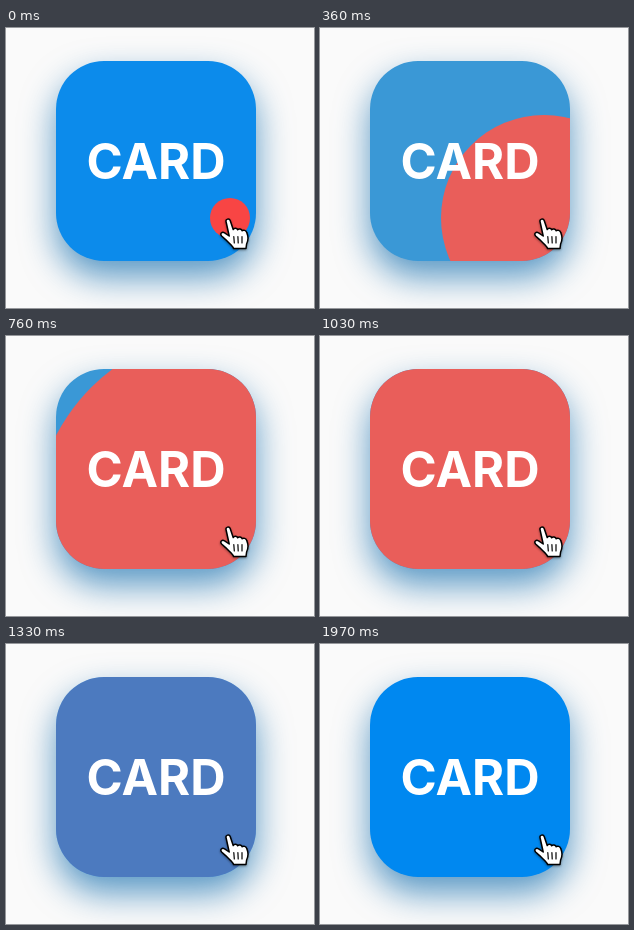
An HTML page for the animation above (2000 ms loop, 308x280 px).

```html
<!DOCTYPE html>
<html lang="en">
<head>
<meta charset="utf-8">
<title>Card ripple</title>
<style>
  html, body { margin: 0; width: 100%; height: 100%; overflow: hidden; background: #fafafa; }
  #card {
    position: absolute; left: 50px; top: 33px; width: 200px; height: 200px;
    border-radius: 48px; overflow: hidden;
    box-shadow: 0 16px 34px rgba(0, 98, 168, .65);
    font: 700 49px/200px Inter, sans-serif; color: #fff; text-align: center;
  }
  #ripple { position: absolute; border-radius: 50%; }
  #card span { position: absolute; inset: 1px 0 0; }
  svg { position: absolute; left: 0; top: 0; filter: drop-shadow(0 1px 1px rgba(0, 0, 0, .4)); }
</style>
</head>
<body>
<div id="card"><div id="ripple"></div><span>CARD</span></div>
<svg width="308" height="280" stroke="#000" stroke-linecap="round" stroke-linejoin="round">
  <path fill="#fff" stroke-width="1.5" d="M220 193.5C219.4 191 223.3 190 224.2 192.6L227.2 201.6
    C228 199.8 231 200 231.6 201.8C232.8 200.4 235.6 200.8 236.2 202.8
    C237.4 201.6 240.2 202.2 240.8 204.6C242.4 208.5 242.6 212 240.6 216L240 220.5H227.6
    C226.6 217.4 222 214.5 219.6 211.6L215.6 208C213.6 205.6 216 203.4 218.6 204.8L223.2 208Z"/>
  <path fill="none" stroke-width="1.2" d="M227.8 208.5L228.3 215M231.9 208.5L232.2 215M236 208.5L236 215"/>
</svg>
<script>
  const LOOP = 2000, CENTER = { x: 174, y: 157 };
  const card = document.getElementById('card');
  const ripple = document.getElementById('ripple');
  const BLUE = [0, 136, 240], SOFT_BLUE = [58, 152, 214];
  const RED = [252, 62, 62], SOFT_RED = [233, 94, 90];

  const progress = (t, start, length) => Math.min(1, Math.max(0, (t - start) / length));
  const smooth = p => p * p * (3 - 2 * p);
  const mix = (a, b, p) => a.map((v, i) => v + (b[i] - v) * p);
  const rgb = c => `rgb(${c.map(Math.round)})`;

  function draw(now) {
    const t = now % LOOP;
    const soften = progress(t, -60, 300);
    const fade = smooth(progress(t, 1152, 290));
    const radius = 20 + 0.231 * Math.min(t, 1100);

    // The softened blue is fully covered before the fade begins.
    const base = t < 1120 ? mix(BLUE, SOFT_BLUE, soften) : BLUE;
    card.style.background = rgb(base);
    ripple.style.background = rgb(mix(RED, SOFT_RED, soften));
    ripple.style.opacity = 1 - fade;
    ripple.style.left = CENTER.x - radius + 'px';
    ripple.style.top = CENTER.y - radius + 'px';
    ripple.style.width = ripple.style.height = 2 * radius + 'px';
  }

  const start = performance.now();
  function tick() {
    draw(performance.now() - start);
    requestAnimationFrame(tick);
  }
  tick();
</script>
</body>
</html>
```
